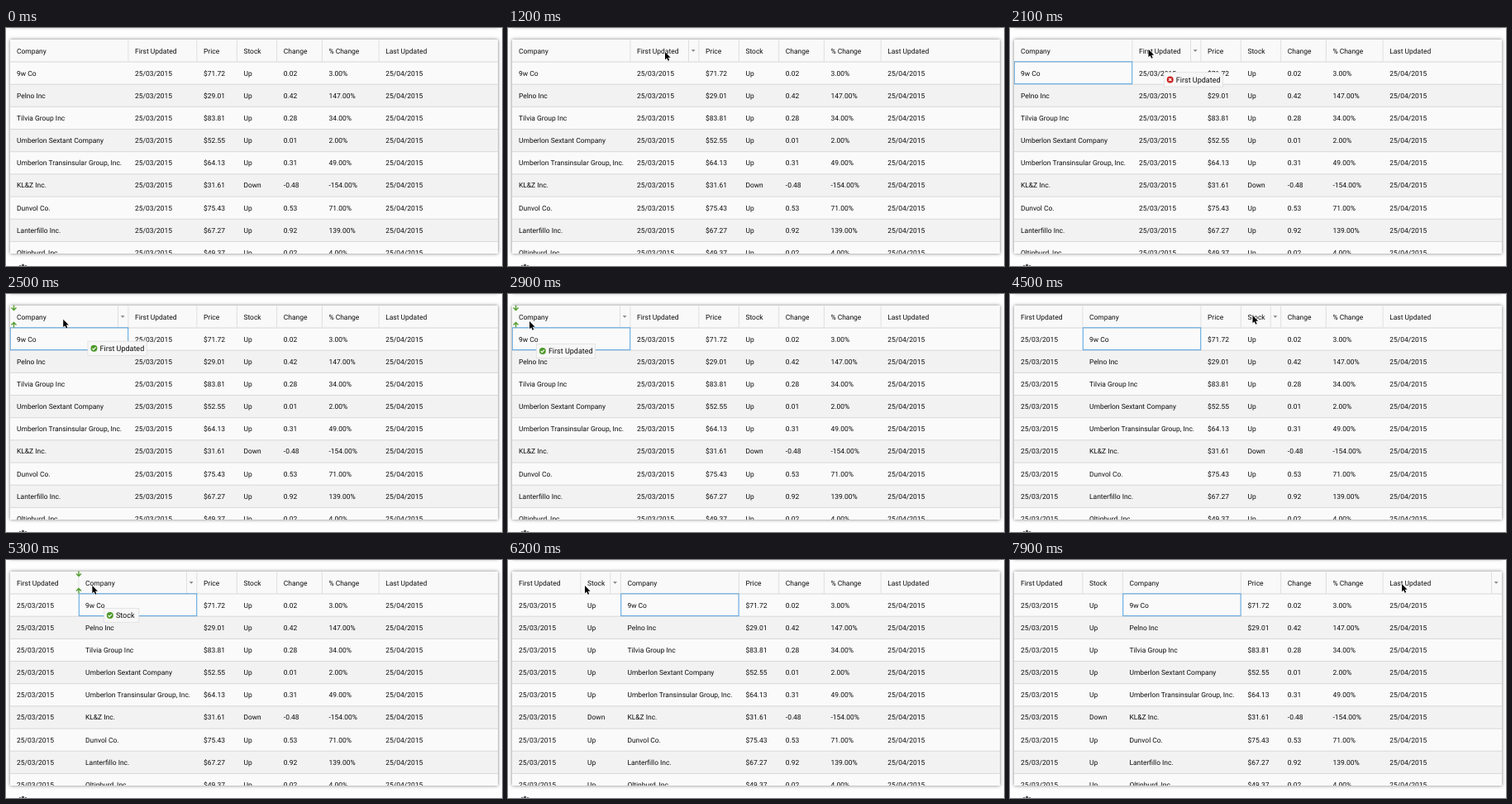
Write an HTML page that moves like this. It is 600 px wide and 288 px high and loops after 8 s.

```html
<!DOCTYPE html>
<html lang="en">
<head>
<meta charset="utf-8">
<title>Column reordering</title>
<style>
  html, body { margin: 0; width: 100%; height: 100%; overflow: hidden; background: #fefefe; }
  svg { display: block; width: 100vw; height: 100vh; }
  text { font-family: Roboto, sans-serif; font-size: 8.46px; fill: #0c0c0c; text-rendering: geometricPrecision; white-space: pre; }
  .ghost text { font-size: 9px; }
  .card { fill: #f9f9f9; filter: drop-shadow(0.8px 0.8px 2px rgba(0, 0, 0, .5)); }
</style>
</head>
<body>
<svg id="stage" viewBox="0 0 600 288"></svg>
<script>
const NS = 'http://www.w3.org/2000/svg';
const LOOP = 8000, STEP = 100;
const LEFT = 5, TOP = 14, RIGHT = 595, BOTTOM = 273, HEAD = 41, ROW = 27.17;
const FOCUS_AT = 1700, POINTER_AT = 100;

// Company | price | change | percent
const rows = `9w Co|71.72|0.02|3
Pelno Inc|29.01|0.42|147
Tilvia Group Inc|83.81|0.28|34
Umberlon Sextant Company|52.55|0.01|2
Umberlon Transinsular Group, Inc.|64.13|0.31|49
KL&Z Inc.|31.61|-0.48|-154
Dunvol Co.|75.43|0.53|71
Lanterfillo Inc.|67.27|0.92|139
Oltinburd, Inc.|49.37|0.02|4`.split('\n').map(line => {
  const [company, price, change, percent] = line.split('|');
  return { company, price, change, percent };
});

const columns = {
  company: { title: 'Company', width: 143, cell: r => r.company },
  first: { title: 'First Updated', width: 83, cell: () => '25/03/2015' },
  price: { title: 'Price', width: 48.4, cell: r => '$' + r.price },
  stock: { title: 'Stock', width: 48.4, cell: r => r.change < 0 ? 'Down' : 'Up' },
  change: { title: 'Change', width: 54.6, cell: r => r.change },
  percent: { title: '% Change', width: 68.8, cell: r => r.percent + '.00%' },
  last: { title: 'Last Updated', width: 143.8, cell: () => '25/04/2015' }
};
const tail = ['change', 'percent', 'last'];
const orders = [
  { from: 0, ids: ['company', 'first', 'price', 'stock', ...tail] },
  { from: 3500, ids: ['first', 'company', 'price', 'stock', ...tail] },
  { from: 5900, ids: ['first', 'stock', 'company', 'price', ...tail] }
];
const drags = [
  { id: 'first', from: 2000, to: 3500, width: 71.3 },
  { id: 'stock', from: 5000, to: 5900, width: 42.5 }
];

const glide = k => k * k * (3 - 2 * k);
const settle = k => 1 - (1 - k) ** 1.4;
const home = { x: 283, y: 200 };
const moves = [
  { from: 400, to: 800, x: 164, y: 30, ease: glide },
  { from: 900, to: 1500, x: 216, y: 28, ease: glide },
  { from: 1800, to: 2100, x: 167.5, y: 26, ease: settle },
  { from: 2100, to: 2800, x: 26, y: 33, ease: settle },
  { from: 3800, to: 4100, x: 253, y: 30, ease: glide },
  { from: 4200, to: 4500, x: 293.5, y: 26, ease: settle },
  { from: 4800, to: 5200, x: 110, y: 31, ease: glide },
  { from: 5200, to: 5500, x: 97, y: 31, ease: settle },
  { from: 5800, to: 6200, x: 93, y: 31, ease: settle },
  { from: 6800, to: 7600, x: 491, y: 29, ease: glide, sag: 22 },
  { from: 7800, to: 7900, x: 474, y: 29, ease: settle }
];

function pointerAt(t) {
  let { x, y } = home;
  for (const m of moves) {
    if (t <= m.from) break;
    const k = m.ease(Math.min(1, (t - m.from) / (m.to - m.from)));
    x += (m.x - x) * k;
    y += (m.y - y) * k + (m.sag || 0) * Math.sin(Math.PI * k);
  }
  return [x, y];
}

function add(parent, tag, attrs = {}, text) {
  const el = document.createElementNS(NS, tag);
  for (const key in attrs) el.setAttribute(key, attrs[key]);
  if (text !== undefined) el.textContent = text;
  return parent.appendChild(el);
}
const rect = (parent, x, y, width, height, attrs) => add(parent, 'rect', { x, y, width, height, ...attrs });
const place = (el, x, y) => el.setAttribute('transform', `translate(${x} ${y})`);
const show = (el, on) => el.setAttribute('visibility', on ? 'visible' : 'hidden');

const stage = document.getElementById('stage');
const clip = add(add(stage, 'defs'), 'clipPath', { id: 'grid' });
rect(clip, LEFT, TOP, RIGHT - LEFT, BOTTOM - TOP);

// Page and card
rect(stage, LEFT, -21, RIGHT - LEFT, 19.5, { class: 'card' });
rect(stage, LEFT, TOP, RIGHT - LEFT, BOTTOM - TOP, { class: 'card' });
for (const [cx, r] of [[17, 0.9], [20.5, 1.7], [24, 0.9]]) {
  add(stage, 'circle', { cx, cy: 288 - r / 2, r, fill: '#555' });
}

// Rows
const grid = add(stage, 'g', { 'clip-path': 'url(#grid)' });
rows.forEach((_, i) => {
  const y = HEAD + i * ROW;
  rect(grid, LEFT, y, RIGHT - LEFT, ROW, { fill: i % 2 ? '#f3f2f3' : '#fafafa' });
  rect(grid, LEFT, y - 0.5, RIGHT - LEFT, 1, { fill: '#d8d8d8' });
});

// Columns
const headLine = (parent, x) => rect(parent, x - 0.5, TOP + 0.5, 0.8, HEAD - TOP - 1, { fill: '#d9d9d9' });
for (const col of Object.values(columns)) {
  col.group = add(grid, 'g');
  add(col.group, 'text', { x: 8, y: 30.5 }, col.title);
  rows.forEach((r, i) => add(col.group, 'text', { x: 8, y: 57.5 + i * ROW }, col.cell(r)));
  col.edge = headLine(col.group, col.width);
  col.menu = add(col.group, 'g');
  headLine(col.menu, col.width - 12.5);
  add(col.menu, 'path', { d: `M${col.width - 9.4} 26.2h5l-2.5 2.6z`, fill: '#808080' });
}
show(columns.last.edge, false);
const focus = rect(columns.company.group, 0.3, HEAD - 0.2, 142.4, 26.8, { fill: 'none', stroke: '#62a8e0', 'stroke-width': 1.1 });

// Drop markers, drag label and pointer
const marker = add(stage, 'g', { fill: 'none', stroke: '#4d9a2a', 'stroke-width': 1.3 });
add(marker, 'path', { d: 'M0 13.5v6M-3 16.5l3 3 3-3M0 40.5v-6M-3 37.5l3-3 3 3' });

const ghost = add(stage, 'g', { class: 'ghost' });
const ghostBox = rect(ghost, 0.3, 0.3, 70, 17.4, { fill: '#f7f7f7', stroke: '#dcdcdc', 'stroke-width': 0.7 });
const badge = add(ghost, 'circle', { cx: 7.8, cy: 9, r: 4 });
const sign = add(ghost, 'path', { fill: 'none', stroke: '#fff', 'stroke-width': 1.2 });
const label = add(ghost, 'text', { x: 14.9, y: 12.2 });

const pointer = add(stage, 'path', {
  d: 'M0 0v9.2l2.1-1.9 1.6 3.4 1.5-.7-1.6-3.3h3z',
  fill: '#000', stroke: '#fff', 'stroke-width': 0.9, 'paint-order': 'stroke', 'stroke-linejoin': 'round'
});

function render(time) {
  const t = Math.floor(time % LOOP / STEP) * STEP;
  const [px, py] = pointerAt(t);
  const visible = t >= POINTER_AT;
  const overHead = visible && py > TOP && py < HEAD;
  const { ids } = orders.filter(o => t >= o.from).pop();

  let x = LEFT, hover = null, hoverX = 0;
  for (const id of ids) {
    const col = columns[id];
    const over = overHead && px >= x && px < x + col.width;
    if (over) { hover = id; hoverX = x; }
    place(col.group, x, 0);
    show(col.menu, over);
    x += col.width;
  }
  show(focus, t >= FOCUS_AT);
  place(pointer, px, py);
  show(pointer, visible);

  const drag = drags.find(d => t >= d.from && t < d.to);
  const allowed = drag && hover && hover !== drag.id;
  show(ghost, drag);
  show(marker, allowed);
  if (!drag) return;
  // The label trails the pointer by one step
  const [gx, gy] = pointerAt(t - STEP);
  place(ghost, gx + 8, gy + 27);
  ghostBox.setAttribute('width', drag.width);
  label.textContent = columns[drag.id].title;
  badge.setAttribute('fill', allowed ? '#4d9a2a' : '#c9211e');
  sign.setAttribute('d', allowed ? 'M5.7 9l1.5 1.6 2.7-3' : 'M6.2 7.4l3.2 3.2M9.4 7.4l-3.2 3.2');
  place(marker, Math.max(hoverX, LEFT + 4.5), 0);
}

const start = performance.now();
function tick() {
  render(performance.now() - start);
  requestAnimationFrame(tick);
}
tick();
</script>
</body>
</html>
```
